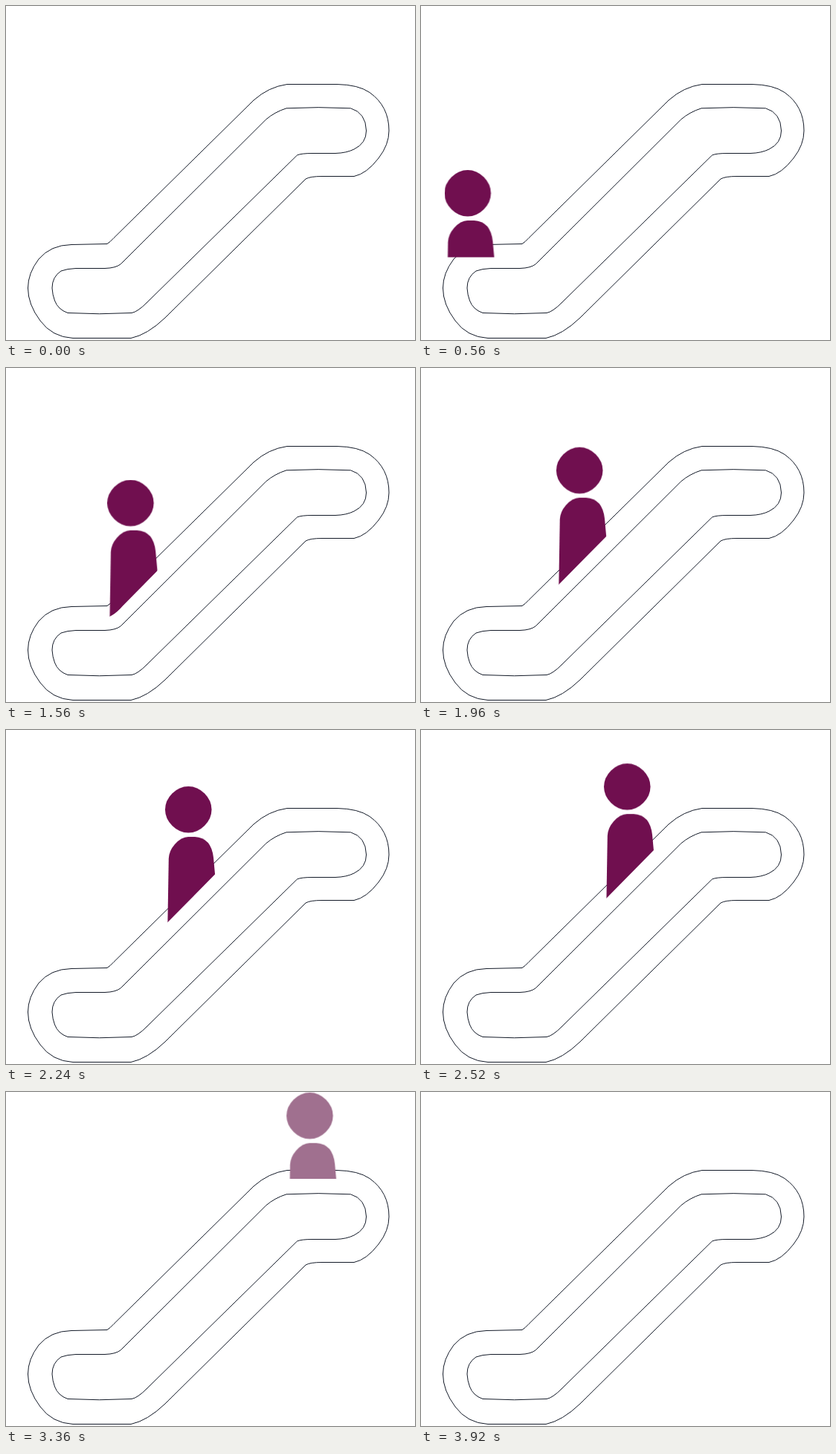
An HTML page without scripts that plays this animation: 550x450 px, repeating every 4 s.

```html
<!DOCTYPE html>
<html lang="en">
<head>
<meta charset="utf-8">
<title>Escalator</title>
<style>
  html, body { margin: 0; width: 100%; height: 100%; overflow: hidden; background: #fff; }
  svg { display: block; width: 550px; height: 450px; }

  .belt { fill: none; stroke: #131a28; stroke-width: 1; }

  .rider {
    fill: #700f4f;
    animation: ride 4s infinite, tint 4s infinite, show 4s step-end infinite;
  }

  /* 1% is one 40 ms tick, so every step count equals its percent span */
  @keyframes ride {
    0%   { transform: translate(28px, 221px); animation-timing-function: steps(13); }
    13%  { transform: translate(28px, 221px); animation-timing-function: steps(10); }
    23%  { transform: translate(63px, 221px); animation-timing-function: steps(50); }
    73%  { transform: translate(291.7px, 1.2px); animation-timing-function: steps(11); }
    84%  { transform: translate(377.2px, 0.7px); animation-timing-function: steps(14); }
    98%, 100% { transform: translate(452.5px, 0.2px); }
  }
  @keyframes tint {
    0%   { fill: #fff; animation-timing-function: steps(13); }
    13%  { fill: #700f4f; }
    75%  { fill: #700f4f; animation-timing-function: steps(9); }
    84%  { fill: #a0708f; animation-timing-function: steps(14); }
    98%, 100% { fill: #fff; }
  }
  @keyframes show {
    0%, 98%, 100% { opacity: 0; }
    1% { opacity: 1; }
  }
</style>
</head>
<body>
<svg viewBox="0 0 550 450">
  <clipPath id="above-steps">
    <path d="M0 0V338.5H127Q143 337 157 320.5L337 137.5Q354 119 375 117H550V0Z"/>
  </clipPath>

  <g class="belt">
    <path d="M136 320.5Q140 318 145 312.5L333 127Q353 109 378 105.5H445Q474 106 489 116.5Q515 135 515 168
      Q515 187 501 205Q485 226 468 229.5H425Q409 229.5 403 233L214 420Q190 443 168 447.5H90
      Q62 446 46 424Q29.5 402 29.5 380Q29.5 360 44 341Q60 322 88 321.5Z"/>
    <path d="M74 357Q82 354 94 353.5H133Q148 353 154.5 347.5L349.5 153Q361 143 377 137.8Q420 135.5 463.5 137.8
      Q484 144 484.5 168Q484.5 185 468 193Q458 198 443 198.5H412Q397 198.5 391.5 201L189 400
      Q177 412 169 413.5Q125 416 83 413.5Q70 409 65.5 397Q62.5 389 62 380Q62 365 74 357Z"/>
  </g>

  <g clip-path="url(#above-steps)">
    <g class="rider">
      <path d="M31.3 0Q43.5 0 53 9.5T62.5 31.3Q62.5 43.5 53 53T31.3 62.5Q19 62.5 9.5 53T0 31.3
        Q0 19 9.5 9.5T31.3 0Z"/>
      <path d="M3.2 195L4.8 97Q5.2 87 13 78Q22 68 31 68H40Q62 69 65 96L67.2 120L71 195Z"/>
    </g>
  </g>
</svg>
</body>
</html>
```
